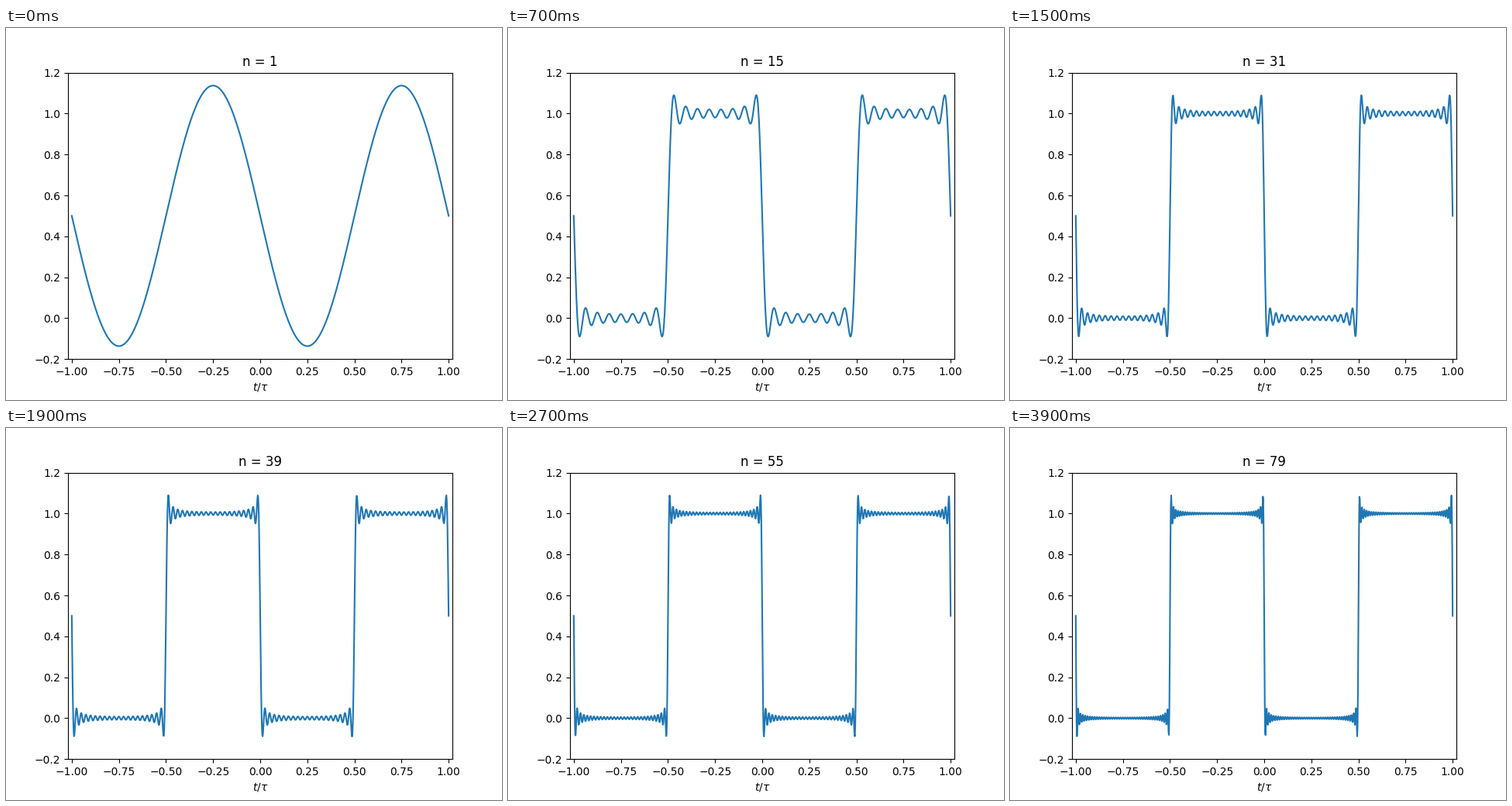
A matplotlib script that plays this animation: 640x480 px, repeating every 4000 ms.

```python
import numpy as np
import matplotlib.pyplot as plt
from matplotlib.animation import FuncAnimation

FRAMES = 40
INTERVAL = 100  # ms

t = np.linspace(-1, 1, 1000)


def square_wave(n):
    """Partial Fourier sum of a square wave, odd harmonics up to n."""
    k = np.arange(1, n + 1, 2)[:, None]
    return 0.5 - 2 / np.pi * np.sum(np.sin(2 * np.pi * k * t) / k, axis=0)


fig, ax = plt.subplots(figsize=(6.4, 4.8), dpi=100)
line, = ax.plot(t, square_wave(1), color="C0", lw=1.5)
ax.set_xlim(-1.02, 1.02)
ax.set_ylim(-0.2, 1.2)
ax.set_xlabel(r"$t/\tau$")
title = ax.set_title("n = 1")


def update(frame):
    n = 2 * frame + 1
    line.set_ydata(square_wave(n))
    title.set_text(f"n = {n}")
    return line, title


anim = FuncAnimation(fig, update, frames=FRAMES, interval=INTERVAL,
                     repeat=True, repeat_delay=0, blit=False)
plt.show()
```
